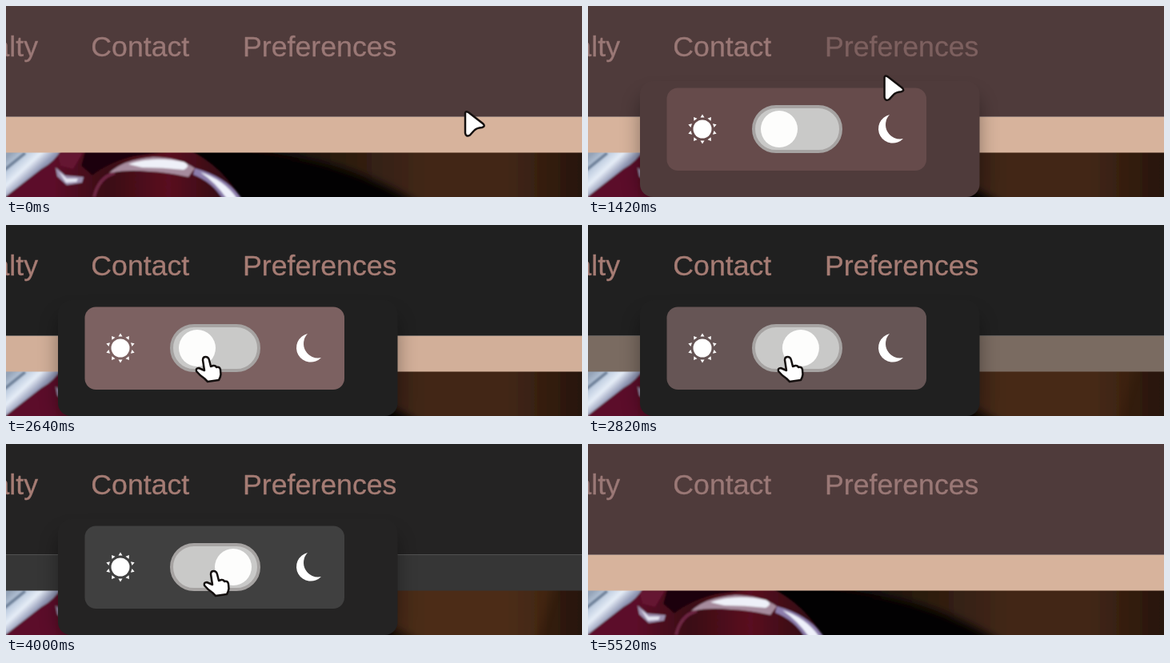
An HTML page that plays this animation: 720 px wide and 239 px high, repeating every 5.7 s.

```html
<!DOCTYPE html>
<html lang="en">
<head>
<meta charset="utf-8">
<title>Theme switch</title>
<style>
html, body { margin: 0; width: 100%; height: 100%; overflow: hidden; }
svg { display: block; width: 100vw; height: 100vh; }
text { font: 35.7px "Liberation Sans", Arial, sans-serif; stroke-width: .3px; }
</style>
</head>
<body>
<svg viewBox="0 0 720 239">
  <defs>
    <linearGradient id="wood" gradientUnits="userSpaceOnUse" x1="330" y1="211" x2="720" y2="211">
      <stop offset="0" stop-color="#120a06"/>
      <stop offset=".2" stop-color="#291a10"/>
      <stop offset=".5" stop-color="#422714"/>
      <stop offset=".75" stop-color="#432816"/>
      <stop offset=".9" stop-color="#321c0f"/>
      <stop offset="1" stop-color="#27140b"/>
    </linearGradient>
    <linearGradient id="cherry" gradientUnits="userSpaceOnUse" x1="60" y1="0" x2="280" y2="0">
      <stop offset="0" stop-color="#5c1029"/>
      <stop offset=".3" stop-color="#3a0914"/>
      <stop offset=".65" stop-color="#5a0d20"/>
      <stop offset="1" stop-color="#300712"/>
    </linearGradient>
    <linearGradient id="glass" gradientUnits="userSpaceOnUse" x1="5" y1="185" x2="32" y2="214">
      <stop offset="0" stop-color="#94a3b7"/>
      <stop offset=".3" stop-color="#b9c8dc"/>
      <stop offset=".65" stop-color="#e6edf7"/>
      <stop offset="1" stop-color="#8d94b2"/>
    </linearGradient>
    <filter id="soft"><feGaussianBlur stdDeviation="1.3"/></filter>
    <filter id="haze" x="-10%" y="-40%" width="120%" height="180%"><feGaussianBlur stdDeviation="6"/></filter>
    <filter id="shade" x="-20%" y="-40%" width="140%" height="180%"><feGaussianBlur stdDeviation="12"/></filter>
    <clipPath id="frame"><rect y="183" width="720" height="56"/></clipPath>
  </defs>

  <g clip-path="url(#frame)">
    <rect y="183" width="720" height="56" fill="#020102"/>
    <path d="M300 160H760V280H560Q500 228 410 200Q360 187 300 180Z" fill="url(#wood)" filter="url(#haze)"/>
    <path id="glow" d="M480 160H690L660 260H480Z" fill="#6b3f1b" filter="url(#haze)"/>
    <g filter="url(#soft)">
      <path d="M-5 178H225Q272 200 296 245H-5Z" fill="url(#cherry)"/>
      <path d="M100 178H232Q200 183 160 188Q128 196 108 212L94 200Z" fill="#1c050b"/>
      <path d="M64 184H96L84 204L68 200Z" fill="#651232"/>
      <path d="M-5 178H70Q62 194 44 204L-5 242Z" fill="url(#glass)"/>
      <path d="M-3 206L24 184" stroke="#71839b" stroke-width="4"/>
      <path d="M62 202L74 212L97 214L95 221L76 224L64 213Z" fill="#9b8fae"/>
      <path d="M66 207L76 216L90 216L88 220L75 221Z" fill="#e4e5f2"/>
      <path d="M110 239Q116 214 136 209" fill="none" stroke="#6d2743" stroke-width="4"/>
      <path d="M129 209Q146 192 184 189Q216 189 236 203L228 214Q202 208 178 207Q152 204 129 209Z" fill="#a68b9d"/>
      <path d="M153 198Q184 187 222 195Q232 200 222 205Q196 202 170 202Z" fill="#eef0f8"/>
      <path d="M236 203L246 206Q280 218 296 243H272Q258 220 234 211Z" fill="#8c7dac"/>
      <path d="M243 208Q272 217 289 241H276Q262 221 243 208Z" fill="#eef0fa"/>
    </g>
  </g>

  <rect id="strip" y="138.500" width="720" height="45"/>
  <rect id="header" width="720" height="138.600"/>

  <g id="menu">
    <rect x="65" y="112" width="424" height="127" rx="16" opacity=".36" filter="url(#shade)"/>
    <rect id="panel" x="65" y="94" width="424.500" height="145" rx="16"/>
    <rect id="box" x="98.500" y="102.500" width="324.500" height="103.500" rx="14"/>
    <rect x="207" y="126" width="109" height="56" rx="28" fill="#c9c9c8" stroke="#a6a3a2" stroke-width="4"/>
    <circle id="knob" cy="154" r="23" fill="#fdfdfc"/>
    <g id="sun" fill="#fff"><circle cx="143" cy="154" r="11.500"/></g>
    <path d="M377 136A18 18 0 1 0 394 166A18 18 0 0 1 377 136Z" fill="#fff"/>
  </g>

  <g id="nav">
    <text x="40" y="63" text-anchor="end">alty</text>
    <text x="106.300" y="63">Contact</text>
    <text id="prefs" x="296" y="63">Preferences</text>
  </g>

  <g fill="#fff" stroke="#15100f" stroke-width="2.500" stroke-linejoin="round">
    <path id="arrow" d="M1 3Q1.500 0 5 2L23 16Q27 19.500 22 21Q15 21.500 12 25L7 30.500Q2 33.500 1 28Z"/>
    <path id="hand" d="M-4 4Q-4 0 -.5 0Q3 0 4 4L6 12L9 11Q12 10.500 13 13Q17 12 18 16L18.500 22Q18 26 16 29L2 31L-2 27Q-8 23 -12 18Q-13 14 -9 14L-2 17Z"/>
  </g>
</svg>
<script>
const LOOP = 5700;
const $ = id => document.getElementById(id);
const set = (id, name, value) => $(id).setAttribute(name, value);

const ramp = (t, from, to) => Math.min(1, Math.max(0, (t - from) / (to - from)));
const smooth = p => p * p * (3 - 2 * p);
const lerp = (a, b, p) => a + (b - a) * p;
const ease = (t, from, to) => smooth(ramp(t, from, to));
// rises over [a, b], falls over [c, d]
const pulse = (t, a, b, c, d) => ease(t, a, b) - ease(t, c, d);
const blend = (a, b, p) => a.map((v, i) => lerp(v, b[i], p));
const rgb = color => `rgb(${color})`;

// [start, end, dx, dy, easing]
const moves = [
  [240, 800, -179, -80, smooth],
  [1140, 1420, -24, 35, p => p * p],
  [1420, 1960, -120, 79, p => p * (2 - p)],
  [3120, 3300, 10, -6, smooth]
];
function pointer(t) {
  let x = 573, y = 131;
  for (const [from, to, dx, dy, curve] of moves) {
    const p = curve(ramp(t, from, to));
    x += dx * p;
    y += dy * p;
  }
  return [x, y];
}

for (let i = 0; i < 10; i++) {
  const ray = document.createElementNS("http://www.w3.org/2000/svg", "path");
  ray.setAttribute("d", "M140.500 139.500L143 135.500L145.500 139.500Z");
  ray.setAttribute("transform", `rotate(${i * 36} 143 154)`);
  $("sun").append(ray);
}

function paintText(id, color) {
  set(id, "fill", rgb(color));
  set(id, "stroke", rgb(color));
}

function draw(t) {
  const darkHead = pulse(t, 2520, 2630, 3980, 4090);
  const darkPage = pulse(t, 2600, 3000, 4020, 4360);
  const darkBox = pulse(t, 2640, 3080, 4030, 4380);
  const slide = pulse(t, 2640, 2960, 4030, 4340);
  const head = blend([79, 59, 59], [32, 32, 32], darkHead);
  const text = blend([154, 120, 118], [166, 124, 116], darkHead);
  const boxLight = blend([102, 75, 75], [124, 97, 97], ease(t, 1480, 1700));

  set("header", "fill", rgb(head));
  set("panel", "fill", rgb(head));
  set("strip", "fill", rgb(blend([215, 179, 156], [54, 54, 54], darkPage)));
  set("glow", "opacity", 0.25 * darkPage);
  set("box", "fill", rgb(blend(boxLight, [64, 64, 64], darkBox)));
  set("knob", "cx", lerp(239, 284, slide));
  paintText("nav", text);
  paintText("prefs", blend(text, [125, 96, 95], pulse(t, 660, 900, 1480, 1700)));
  set("menu", "opacity", pulse(t, 660, 1000, 5160, 5500));

  const [x, y] = pointer(t);
  const overSwitch = x < 318 && y > 124;
  for (const id of ["arrow", "hand"]) {
    set(id, "transform", `translate(${x} ${y})`);
    set(id, "visibility", t < 5160 && overSwitch === (id === "hand") ? "visible" : "hidden");
  }
}

const start = performance.now();
function tick() {
  draw((performance.now() - start) % LOOP);
  requestAnimationFrame(tick);
}
tick();
</script>
</body>
</html>
```
